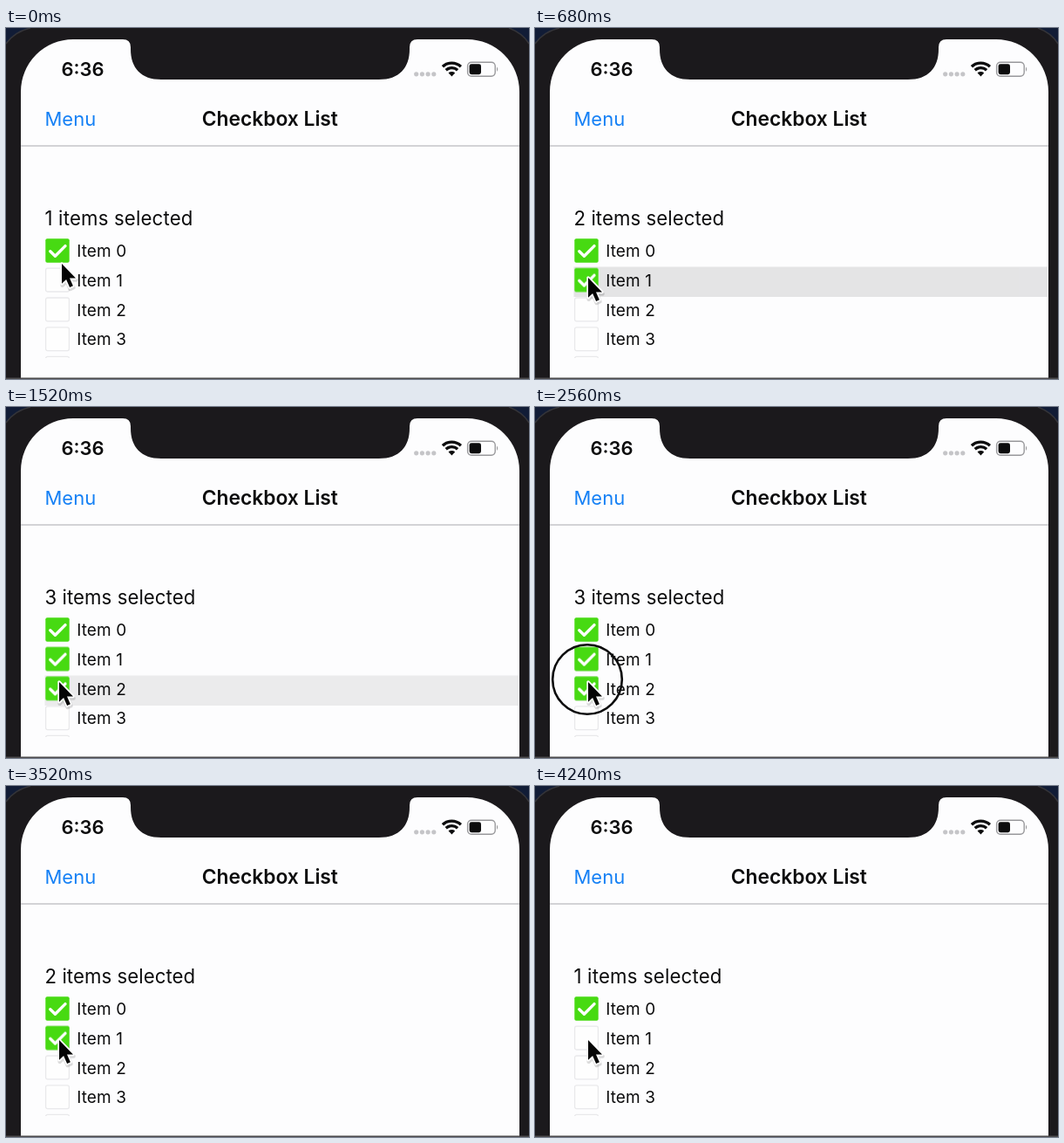
Recreate the animation shown at these times as an HTML page. Size 600 px wide and 402 px high, loop 4.8 s.

```html
<!DOCTYPE html>
<html lang="en">
<head>
<meta charset="utf-8">
<title>Checkbox List</title>
<style>
html, body { margin: 0; width: 100%; height: 100%; overflow: hidden; background: #1b191c; }
svg { display: block; width: 600px; height: 402px; }
text { font-family: Inter, Roboto, sans-serif; font-weight: 430; fill: #0c0c0d; }
.bold { font-weight: 600; }
.item { font-size: 19px; letter-spacing: .08px; }
.count { font-size: 22.2px; letter-spacing: .06px; }
.count .one { letter-spacing: .18px; }
.box { fill: #fefefe; stroke: #e9e9eb; stroke-width: 1.3; }

.one, .two, .three, .tick1, .tick2, .ring { animation: 4.8s step-end infinite; }
.one { animation-name: one; }
.two { animation-name: two; }
.three, .tick2 { animation-name: three; }
.tick1 { animation-name: tick1; }
.ring { animation-name: ring; }
.glow1 { animation: glow1 4.8s linear infinite; }
.glow2 { animation: glow2 4.8s linear infinite; }
.pointer { animation: move 4.8s ease-in-out infinite; }

@keyframes one { 0% { opacity: 1 } 10% { opacity: 0 } 77.5%, 100% { opacity: 1 } }
@keyframes two { 0% { opacity: 0 } 10% { opacity: 1 } 26% { opacity: 0 } 55% { opacity: 1 } 77.5%, 100% { opacity: 0 } }
@keyframes three { 0% { opacity: 0 } 26% { opacity: 1 } 55%, 100% { opacity: 0 } }
@keyframes tick1 { 0% { opacity: 0 } 10% { opacity: 1 } 77.5%, 100% { opacity: 0 } }
@keyframes ring {
  0% { opacity: 0 }
  6.66% { opacity: 1 } 10% { opacity: 0 }
  23.3% { opacity: 1 } 26% { opacity: 0 }
  53.3% { opacity: 1 } 55% { opacity: 0 }
  74.9% { opacity: 1 } 77.5%, 100% { opacity: 0 }
}
@keyframes glow1 {
  0%, 9.99% { opacity: 0 }
  10%, 10.6% { opacity: 1 }
  18.9%, 77.49% { opacity: 0 }
  77.5%, 78.3% { opacity: 1 }
  86.6%, 100% { opacity: 0 }
}
@keyframes glow2 {
  0%, 25.99% { opacity: 0 }
  26%, 26.8% { opacity: 1 }
  35%, 54.99% { opacity: 0 }
  55%, 56% { opacity: 1 }
  64.1%, 100% { opacity: 0 }
}
@keyframes move {
  0% { transform: translate(63px, 267px) }
  6% { transform: translate(59px, 284px) }
  10%, 14.6% { transform: translate(60px, 283px) }
  23%, 26% { transform: translate(60px, 313px) }
  30%, 65% { transform: translate(60px, 312px) }
  73%, 100% { transform: translate(60px, 288px) }
}
</style>
</head>
<body>
<svg viewBox="0 0 600 402">
  <defs>
    <clipPath id="list"><rect x="40" y="230" width="550" height="148"/></clipPath>
    <g id="tick">
      <rect x=".3" y=".3" width="27.4" height="27.4" rx="2" fill="#47da12"/>
      <path d="M5.8 14.8L11.4 20.2L23 8.6" fill="none" stroke="#fff" stroke-width="3.4" stroke-linecap="round" stroke-linejoin="round"/>
    </g>
    <rect id="box" class="box" x=".6" y=".6" width="26.8" height="26.8" rx="2"/>
    <path id="arrow" d="M1 3V25.8L6.1 20.9L10.1 30L13.9 28.3L10 19.5H17Z" stroke-linejoin="round"/>
  </defs>

  <!-- phone body -->
  <rect width="600" height="402" fill="#1b191c"/>
  <path d="M0 0H28Q10 4 0 18ZM600 0H577Q593 6 600 18Z" fill="#111c36"/>
  <path d="M0 18Q10 4 28 0M577 0Q593 6 600 18" fill="none" stroke="#343439" stroke-width="1.5"/>

  <!-- display with notch -->
  <path fill="#fdfdfe" d="M17 402V73A60 60 0 0 1 77 13H134Q143 13 143 22V24C143 46 155 59 178 59H428C451 59 463 46 463 24V22Q463 13 472 13H529A60 60 0 0 1 589 73V402Z"/>
  <path d="M17 135H589" stroke="#c6c6c9" stroke-width="1.5"/>

  <!-- status bar -->
  <text class="bold" x="63.5" y="55" font-size="22">6:36</text>
  <g fill="#c5c5c8">
    <circle cx="470.7" cy="52.8" r="2.6"/><circle cx="477.4" cy="52.8" r="2.6"/>
    <circle cx="484.1" cy="52.8" r="2.6"/><circle cx="490.8" cy="52.8" r="2.6"/>
  </g>
  <g fill="none" stroke="#0c0c0d" stroke-width="3.3">
    <path d="M500.9 44.2A15.4 15.4 0 0 1 521.9 44.2M504.7 48.3A9.8 9.8 0 0 1 518.1 48.3"/>
    <path d="M507.6 51.4A5.6 5.6 0 0 1 515.2 51.4L511.4 55.5Z" fill="#0c0c0d" stroke="none"/>
  </g>
  <rect x="529.6" y="39.2" width="31.6" height="16" rx="4.4" fill="none" stroke="#98989b" stroke-width="1.4"/>
  <rect x="531.6" y="41.2" width="13.4" height="12" rx="2.4" fill="#0c0c0d"/>
  <path d="M563 44.5Q565.4 47.2 563 50Z" fill="#98989b"/>

  <!-- navigation bar -->
  <text x="44.5" y="112" font-size="22" style="fill:#1580f5">Menu</text>
  <text class="bold" x="302.8" y="112" font-size="22.8" text-anchor="middle">Checkbox List</text>

  <g class="count">
    <text class="one" x="44.5" y="225.5">1 items selected</text>
    <text class="two" x="44.5" y="225.5">2 items selected</text>
    <text class="three" x="44.5" y="225.5">3 items selected</text>
  </g>

  <g clip-path="url(#list)">
    <g fill="#d1d1d3">
      <rect class="glow1" x="44.5" y="273.5" width="544" height="34.5"/>
      <rect class="glow2" x="44.5" y="307.5" width="544" height="34.5"/>
    </g>
    <use href="#tick" x="45" y="241"/>
    <use href="#box" x="45" y="274.6"/>
    <use href="#box" x="45" y="308.4"/>
    <use href="#box" x="45" y="342.2"/>
    <use href="#box" x="45" y="375.8"/>
    <use class="tick1" href="#tick" x="45" y="274.6"/>
    <use class="tick2" href="#tick" x="45" y="308.4"/>
    <g class="item">
      <text x="81.3" y="262">Item 0</text>
      <text x="81.3" y="295.8">Item 1</text>
      <text x="81.3" y="329.6">Item 2</text>
      <text x="81.3" y="363.4">Item 3</text>
    </g>
  </g>

  <path d="M0 401.2H600" stroke="#4a494b" stroke-width="1.6"/>

  <g class="pointer">
    <circle class="ring" r="39.8" fill="none" stroke="#0c0c0d" stroke-width="2.6"/>
    <use href="#arrow" x=".6" y="2" fill="none" stroke="#000" stroke-opacity=".14" stroke-width="4.4"/>
    <use href="#arrow" fill="#050505" stroke="#fff" stroke-width="3.4" paint-order="stroke"/>
  </g>
</svg>
</body>
</html>
```
